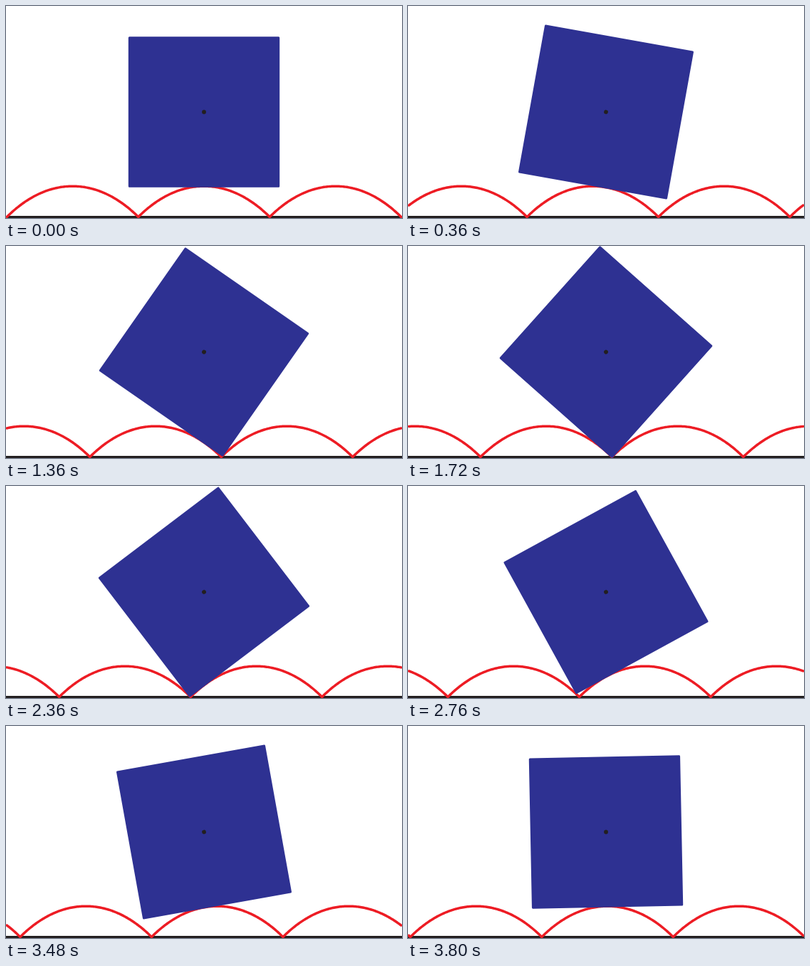
Write an HTML page with a canvas that moves like this. It is 556 by 299 pixels and loops after 3840 ms.

```html
<!DOCTYPE html>
<html lang="en">
<head>
<meta charset="utf-8">
<title>Square wheel on a catenary road</title>
<style>
  html, body { margin: 0; width: 100%; height: 100%; overflow: hidden; background: #fff; }
  canvas { display: block; }
</style>
</head>
<body>
<canvas id="stage" width="556" height="299"></canvas>
<script>
const ctx = document.getElementById('stage').getContext('2d');
const CX = 278, CY = 149.5;
const STEP = 40, STEPS = 96;
const INK = '#231f20', BLUE = '#2e3192', RED = '#ed1c24';
const SPAN = 184.5;                          // one road bump
const HALF = SPAN / 2;
const APOTHEM = HALF / Math.asinh(1);        // half the square's side

// Distance rolled, slowing a little as each corner comes down.
function rolled(time) {
  const step = Math.floor(time / STEP) % STEPS;
  const p = ((step + STEPS / 2) % STEPS) / (STEPS / 2) - 1;
  return HALF * p * (1.081 - 0.081 * p * p);
}

function stroke(color, width) {
  ctx.strokeStyle = color;
  ctx.lineWidth = width;
  ctx.stroke();
}

function drawGround() {
  const y = CY + APOTHEM * Math.SQRT2 - 0.1;
  ctx.beginPath();
  ctx.moveTo(-2, y);
  ctx.lineTo(558, y);
  stroke(INK, 3);
}

function drawRoad(shift) {
  const reach = SPAN * 1.5;
  const height = x => {
    const u = x + shift;
    return APOTHEM * Math.cosh((u - SPAN * Math.round(u / SPAN)) / APOTHEM);
  };
  const xs = [];
  for (let x = -reach; x < reach; x += 1.5) xs.push(x);
  for (let k = -2; k <= 2; k++) {            // exact cusps
    const x = (k + 0.5) * SPAN - shift;
    if (Math.abs(x) < reach) xs.push(x);
  }
  xs.push(reach);
  xs.sort((a, b) => a - b);
  ctx.beginPath();
  for (const x of xs) ctx.lineTo(CX + x, CY + height(x));
  stroke(RED, 3.5);
}

function drawWheel(angle) {
  ctx.save();
  ctx.translate(CX, CY);
  ctx.rotate(angle);
  ctx.beginPath();
  ctx.rect(-APOTHEM, -APOTHEM, 2 * APOTHEM, 2 * APOTHEM);
  ctx.fillStyle = BLUE;
  ctx.fill();
  stroke(BLUE, 3);
  ctx.beginPath();
  ctx.arc(0, 0, 2.9, 0, 2 * Math.PI);
  ctx.fillStyle = INK;
  ctx.fill();
  ctx.restore();
}

function draw() {
  const x = rolled(performance.now());
  ctx.fillStyle = '#fff';
  ctx.fillRect(0, 0, 556, 299);
  ctx.lineCap = ctx.lineJoin = 'round';
  drawGround();
  drawRoad(x);
  drawWheel(Math.atan(Math.sinh(x / APOTHEM)));
  requestAnimationFrame(draw);
}
draw();
</script>
</body>
</html>
```
